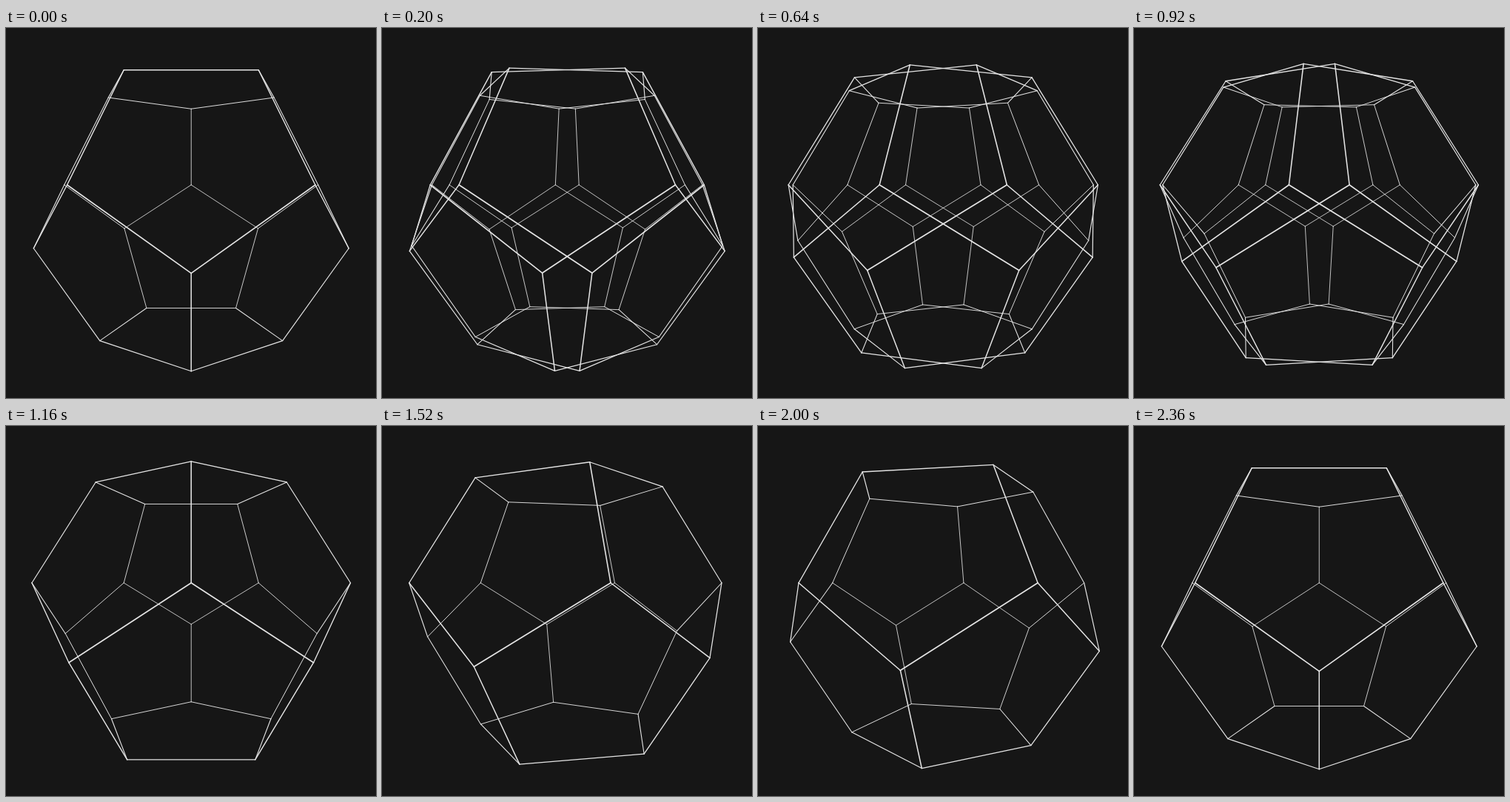
Animation of 500x500 px, one loop 2.4 s. Source, as an HTML page:

```html
<!DOCTYPE html>
<html lang="en">
<head>
<meta charset="utf-8">
<title>Turning dodecahedron</title>
<style>
  html, body { margin: 0; width: 100%; height: 100%; overflow: hidden; background: #161616; }
  svg { display: block; width: 100vw; height: 100vh; }
  line { stroke: #e4e4e4; stroke-linecap: round; }
</style>
</head>
<body>
<svg id="stage" viewBox="0 0 500 500"></svg>
<script>
const STEP = 40, FRAMES = 60, TURN = 29;
const CENTER = 250.25, FOCAL = 546.9, DIST = 3.768, LINE = 4.1;
const RAD = Math.PI / 180;

// Dodecahedron with unit edges, standing on a face: four rings of five corners.
const PHI = (1 + Math.sqrt(5)) / 2;
const CAP = 0.5 / Math.sin(36 * RAD), BELT = CAP * PHI;
const HIGH = 1.11352, LOW = 0.26287;
const rings = [
  { r: CAP, y: HIGH, az: 180 },
  { r: BELT, y: LOW, az: 180 },
  { r: BELT, y: -LOW, az: 0 },
  { r: CAP, y: -HIGH, az: 0 }
];

const id = (ring, i) => ring * 5 + i % 5;
const edges = [];
for (let i = 0; i < 5; i++) {
  edges.push(
    [id(0, i), id(0, i + 1)],
    [id(0, i), id(1, i)],
    [id(1, i), id(2, i + 2)],
    [id(1, i), id(2, i + 3)],
    [id(2, i), id(3, i)],
    [id(3, i), id(3, i + 1)]
  );
}

// The camera is level with the upper belt and aims at the middle of the solid.
const sinTilt = LOW / DIST, cosTilt = Math.sqrt(1 - sinTilt * sinTilt);

function project(r, y, az) {
  const x = r * Math.sin(az * RAD), z = r * Math.cos(az * RAD);
  const depth = DIST - z * cosTilt - y * sinTilt;
  const scale = FOCAL / depth;
  return {
    x: CENTER + x * scale,
    y: CENTER - (y * cosTilt - z * sinTilt) * scale,
    depth
  };
}

const stage = document.getElementById("stage");

function makeSolid() {
  const group = document.createElementNS(stage.namespaceURI, "g");
  const lines = edges.map(() =>
    group.appendChild(document.createElementNS(stage.namespaceURI, "line")));
  stage.appendChild(group);
  return { group, lines };
}

function drawSolid(solid, angle) {
  const points = rings.flatMap(({ r, y, az }) =>
    [0, 1, 2, 3, 4].map(i => project(r, y, az + 72 * i + angle)));
  edges.forEach(([from, to], n) => {
    const a = points[from], b = points[to], line = solid.lines[n];
    line.setAttribute("x1", a.x.toFixed(2));
    line.setAttribute("y1", a.y.toFixed(2));
    line.setAttribute("x2", b.x.toFixed(2));
    line.setAttribute("y2", b.y.toFixed(2));
    line.setAttribute("stroke-width", (2 * LINE / (a.depth + b.depth)).toFixed(2));
  });
}

const main = makeSolid(), twin = makeSolid();

function render(time) {
  const k = Math.floor((time + 1) / STEP) % FRAMES;
  const angle = k <= TURN ? 36 * k / TURN : 36 + 36 * (k - TURN) / (FRAMES - 1 - TURN);
  drawSolid(main, angle);
  // The counter-turning twin only shows while the two are apart.
  const apart = k > 0 && k < TURN;
  twin.group.style.display = apart ? "" : "none";
  if (apart) drawSolid(twin, -angle);
}

function tick(now) {
  render(now);
  requestAnimationFrame(tick);
}
render(0);
requestAnimationFrame(tick);
</script>
</body>
</html>
```
